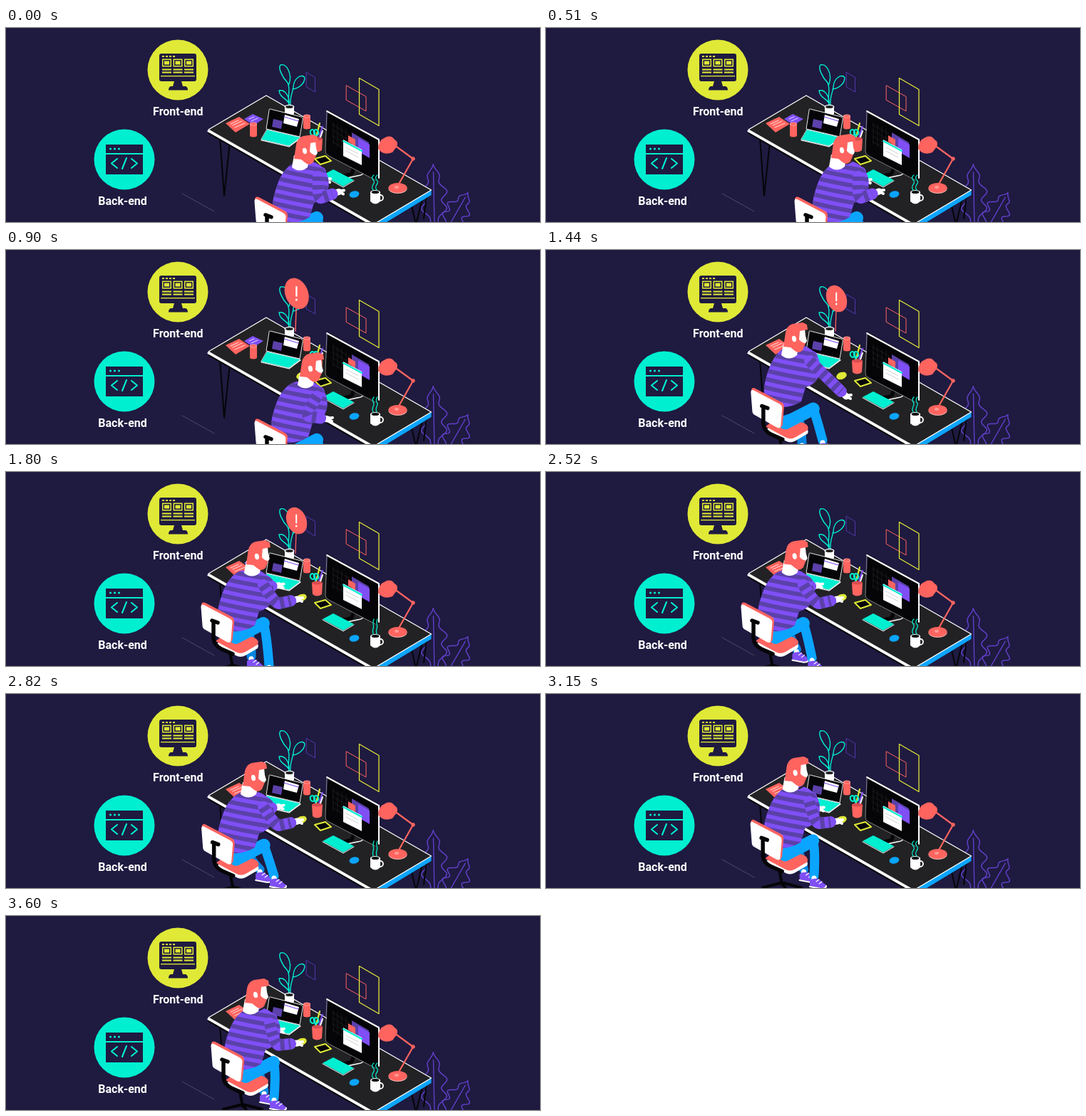
An HTML page with a canvas for the animation above (3630 ms loop, 749 by 273 pixels).

```html
<!DOCTYPE html>
<html lang="en">
<head>
<meta charset="utf-8">
<title>Developer at a desk</title>
<style>
  html, body { margin: 0; width: 100%; height: 100%; overflow: hidden; background: #1f1a40; }
  canvas { display: block; }
</style>
</head>
<body>
<canvas id="stage" width="749" height="273"></canvas>
<script>
const ctx = document.getElementById('stage').getContext('2d');
const LOOP = 3630;
const NIGHT = '#1f1a40', RED = '#ff645f', TEAL = '#00efd1', YELLOW = '#dfe936',
      PURPLE = '#7f4ff5', STRIPE = '#5b41a9', BLUE = '#0ba5ff', BLACK = '#050508',
      DESK = '#222224', WHITE = '#fff', LEAF = '#5f3fc6';

const clamp = v => Math.max(0, Math.min(1, v));
const smooth = v => { v = clamp(v); return v * v * (3 - 2 * v); };

// Each track is a list of [time, x, y].
const tracks = {
  chair: [[0, 75, 54], [1140, 75, 54], [1560, -1, 0], [1740, 0, 0], [2760, 0, 0], [3220, 14, -7]],
  torso: [[0, 77, 50], [600, 77, 50], [860, 75, 47], [1140, 75, 47], [1440, 9, -3], [1700, 0, 0], [2780, 0, 0], [3220, 9, -8]],
  head: [[0, 421, 167], [510, 417, 166], [620, 417, 166], [870, 429, 161], [1140, 428, 163], [1440, 350, 119],
         [1700, 354, 113], [2160, 353, 113], [2820, 349, 112], [3240, 352, 104], [3600, 352, 105]],
  near: [[0, 467, 229], [640, 467, 229], [860, 451, 238], [1140, 451, 238], [1440, 421, 206], [1640, 409, 179]],
  far: [[0, 448, 214], [620, 448, 214], [820, 424, 210], [1140, 424, 210], [1440, 350, 174], [1700, 382, 160]],
  foot: [[0, 455, 326], [1140, 455, 326], [1440, 392, 279], [1700, 373, 283], [2160, 373, 282], [2800, 380, 267]],
  farFoot: [[0, 425, 320], [1140, 425, 320], [1560, 348, 274], [2160, 348, 265], [2780, 360, 258], [3220, 366, 258]]
};

function at(track, t) {
  let prev = track[0];
  for (const key of track) {
    if (key[0] > t) {
      const k = smooth((t - prev[0]) / (key[0] - prev[0]));
      return [prev[1] + (key[1] - prev[1]) * k, prev[2] + (key[2] - prev[2]) * k];
    }
    prev = key;
  }
  return [prev[1], prev[2]];
}

function shape(d, fill, stroke, width = 1) {
  const path = new Path2D(d);
  if (fill) { ctx.fillStyle = fill; ctx.fill(path); }
  if (stroke) { ctx.strokeStyle = stroke; ctx.lineWidth = width; ctx.stroke(path); }
}
const line = (d, color, width) => shape(d, null, color, width);

function oval(x, y, rx, ry, fill, angle = 0) {
  ctx.beginPath();
  ctx.ellipse(x, y, rx, ry, angle, 0, 7);
  ctx.fillStyle = fill;
  ctx.fill();
}

function box(x, y, w, h, color) {
  ctx.fillStyle = color;
  ctx.fillRect(x, y, w, h);
}

function shifted([x, y], draw) {
  ctx.save();
  ctx.translate(x, y);
  draw();
  ctx.restore();
}

function drawBadges() {
  oval(241, 59, 42.5, 42.5, YELLOW);
  ctx.fillStyle = NIGHT;
  ctx.beginPath();
  ctx.roundRect(215, 36, 52, 39, 3);
  ctx.fill();
  for (let i = 0; i < 4; i++) box(219 + i * 5, 39, 3, 2, YELLOW);
  for (let i = 0; i < 3; i++) {
    const x = 219 + i * 15.5;
    box(x, 43.5, 13, 11, YELLOW);
    box(x + 1.5, 45, 10, 8, NIGHT);
    box(x + 3, 46.5, 7, 5, YELLOW);
    box(x, 57.5, 13, 2, YELLOW);
    box(x, 61.5, 13, 2, YELLOW);
  }
  box(217, 67, 48, 1.3, YELLOW);
  shape('M236 75H246L248 82H252Q255 83 255 87.5H228Q228 83 231 82H234Z', NIGHT);

  oval(166, 185, 42.5, 42.5, TEAL);
  box(140, 164, 52, 12, NIGHT);
  box(140, 178, 52, 28, NIGHT);
  for (let i = 0; i < 3; i++) oval(146.5 + i * 6, 170, 1.6, 1.6, TEAL);
  line('M156 184L148 190.5L156 197M176 184L184 190.5L176 197M169 183L163 198', TEAL, 2.1);

  ctx.fillStyle = WHITE;
  ctx.font = 'bold 16px Roboto, sans-serif';
  ctx.textAlign = 'center';
  ctx.fillText('Front-end', 241.3, 123);
  ctx.fillText('Back-end', 163.5, 249);
}

function drawRoom() {
  line('M421.5 62.5L433.5 69.5V90L421.5 83Z', LEAF, .8);
  line('M477.5 81L505 96.5V117L477.5 101.5Z', RED, 1);
  line('M495.5 70.5L523 86.5V137.5L495.5 121.5Z', YELLOW, 1.3);
  line('M247 233L292 258', '#5a5470', .8);
}

function drawLeaf(x, y, height, width, angle) {
  const edge = (u, side) => {
    const lobes = .76 + .24 * Math.cos(u * Math.PI * 7);
    return [side * width * Math.sin(Math.PI * u ** .85) * lobes, -height * u];
  };
  shifted([x, y], () => {
    ctx.rotate(angle);
    ctx.strokeStyle = LEAF;
    ctx.lineWidth = 1.5;
    for (const side of [-1, 1]) {
      ctx.beginPath();
      for (let u = 0; u <= 1.001; u += .025) ctx.lineTo(...edge(u, side));
      ctx.stroke();
    }
    line(`M0 0V${-height * .88}`, LEAF, 1.4);
  });
}

function drawDesk() {
  drawLeaf(601, 280, 88, 20, -.02);
  drawLeaf(618, 284, 60, 19, .52);
  line('M300 154L306 236L314 160M568 246L575 277L584 240M590 236L586 268', BLACK, 2);
  shape('M284 143L516 276V282L284 149Z', BLACK);
  line('M284 145L516 278', WHITE, 3);
  shape('M596.5 228L516 276V284L596.5 235Z', BLUE);
  shape('M284 143L365 95L596.5 228L516 276Z', DESK, WHITE, 1.3);
}

function drawCan(x, y) {
  box(x - 5, y - 8, 10, 16, RED);
  oval(x, y + 8, 5, 2.5, RED);
  oval(x, y - 8, 5, 2.6, '#ff9994');
  oval(x, y - 8, 3.7, 1.7, RED);
}

function drawAlert(t) {
  if (t < 630 || t > 2250) return;
  const grow = t < 900 ? 1.16 * smooth((t - 630) / 240) : 1.16 - .16 * smooth((t - 900) / 180);
  ctx.save();
  ctx.globalAlpha = 1 - smooth((t - 2010) / 230);
  ctx.translate(406, 114);
  ctx.scale(grow, grow);
  line('M0 0L1 -30', RED, 1.3);
  oval(1.5, -45.5, 13.8, 19.5, RED, -.38);
  line('M1.2 -53.5V-42.5', WHITE, 2);
  oval(1.2, -38, 1.3, 1.5, WHITE);
  ctx.restore();
}

function drawPlantAndLaptop(t) {
  shape('M308 134L327 125L342 135L322 147Z', RED);
  line('M315 135L326 130M318 137L331 131M321 140L335 134', WHITE, .8);
  shape('M334 128L346 121L361 128L347 137Z', PURPLE);
  line('M341 128L348 125M344 131L353 127', WHITE, .8);
  drawCan(347, 143);
  drawCan(422, 132);

  line('M397 110C394 94 400 88 395 77C388 70 381 56 385 52C393 49 402 64 397 79M399 110C398 94 403 89 403 83C404 69 416 64 419 70C419 80 407 86 402 86M397 107C395 99 384 99 383 88C391 86 398 96 397 107', TEAL, 1.4);
  drawAlert(t);
  shape('M391 111V121Q397.5 128 404 121V111Z', WHITE);
  oval(397.5, 111, 7, 3.2, WHITE);
  oval(397.5, 111, 5.3, 2.1, DESK);

  shape('M371 114Q369 113 369 116L365 142L412 153L416 130Q417 126 414 125Z', BLACK, WHITE, .9);
  shape('M375 128L388 131L386 142L373 139Z', STRIPE);
  shape('M391 122L411 128L408 139L389 134Z', WHITE);
  line('M390 125L410 131', PURPLE, 1.2);
  shape('M366 143L413 154L397 166L358 157Z', TEAL, WHITE, .7);
  line('M358 158L397 167L413 155', WHITE, 1.2);
}

function drawTools() {
  line('M434 157L440 134', YELLOW, 2.2);
  line('M438 157L444 139', PURPLE, 2.2);
  line('M440 157L444 145', WHITE, 2);
  line('M435 157L433 148', TEAL, 2);
  ctx.strokeStyle = TEAL;
  for (const x of [430, 435]) {
    ctx.beginPath();
    ctx.ellipse(x, 147, 3.2, 4, -.3, 0, 7);
    ctx.stroke();
  }
  shape('M429 156H444L443 172Q436 177 430 172Z', RED);
  oval(436.5, 156, 7.5, 2.5, '#d94c50');
  shape('M433 184L448 180L456 187L441 192Z', BLACK, YELLOW, 2);
  oval(414.5, 177, 7.5, 5, YELLOW, -.35);
}

function drawMonitor() {
  line('M488 196L486 202Q486 206 478 207L468 209', BLACK, 5);
  line('M501 201Q503 207 493 208L474 212L468 208', WHITE, 1.3);
  shape('M452 116L523 156V211Q522 215 518 214L451 179Q448 177 448 173Z', BLACK);
  line('M450 117L523 157V211', WHITE, 2);
  line('M450 117L448 173Q448 177 451 179L518 214', '#999', .8);
  ctx.globalAlpha = .2;
  for (let i = 0; i < 4; i++) {
    line(`M${459 + i * 6} ${133 + i * 3}V${164 + i * 3}M458 ${136 + i * 8}L482 ${150 + i * 8}`, '#aaa', .6);
  }
  ctx.globalAlpha = 1;
  shape('M485 147L509 161V181L485 168Z', STRIPE);
  shape('M494 155L510 164V183L494 174Z', PURPLE);
  shape('M480 151L490 157V166L480 160Z', RED);
  shape('M473 157L499 171V193L473 180Z', WHITE);
  line('M473 159L499 173', TEAL, 2);
  line('M477 168L494 177M477 173L494 182', '#cfd0d5', 1);

  shape('M444 207L459 199L488 214L473 223Z', TEAL);
  line('M444 208L473 224L488 215', WHITE, 1);
  oval(488.5, 234, 7, 4.7, BLUE, -.2);
}

function drawMugAndLamp(t) {
  ctx.strokeStyle = WHITE;
  ctx.lineWidth = 1.8;
  ctx.beginPath();
  ctx.ellipse(525, 239, 4, 4, 0, 0, 7);
  ctx.stroke();
  shape('M511 231H525V244Q518 251 511 244Z', WHITE);
  oval(518, 231, 7, 3, WHITE);
  oval(518, 231, 5.3, 2, BLACK);
  const sway = 1.5 * Math.cos(t / LOOP * Math.PI * 14);
  for (const x of [514, 519]) {
    line(`M${x + 1} 228C${x - 3 - sway} 221 ${x + 5 + sway} 219 ${x + 1} 214Q${x - 1 - sway} 210 ${x + 2} 207`, TEAL, 1.3);
  }

  oval(549.5, 226, 13, 7, '#ffc0ba');
  oval(549.5, 225, 13, 7, RED);
  line('M549 223L571 184L545 165', RED, 2.2);
  oval(571, 184, 2.7, 2.7, RED);
  oval(548, 224, 3, 2, '#ff9994');
  shape('M522 170Q522 158 532 154Q540 150 545 157Q551 160 548 167L542 175Q529 180 522 170Z', RED);
}

// Stripes run across the limb by dashing the same path.
function sleeve(d) {
  line(d, PURPLE, 16);
  ctx.save();
  ctx.lineCap = 'butt';
  ctx.setLineDash([6, 6]);
  line(d, STRIPE, 16);
  ctx.restore();
}

function drawArm([sx, sy], [hx, hy], reach, curl) {
  const dx = hx - sx, dy = hy - sy, dist = Math.hypot(dx, dy) || 1;
  const bend = Math.sqrt(Math.max(0, reach * reach - dist * dist / 4)) * curl;
  const ex = (sx + hx) / 2 - dy / dist * bend, ey = (sy + hy) / 2 + dx / dist * bend;
  const angle = Math.atan2(hy - ey, hx - ex);
  const cx = hx - 10 * Math.cos(angle), cy = hy - 10 * Math.sin(angle);
  line(`M${cx} ${cy}L${hx} ${hy}`, WHITE, 9);
  line(`M${hx} ${hy - 1}l7 -1M${hx} ${hy}l6 3`, WHITE, 4);
  sleeve(`M${sx} ${sy}Q${ex} ${ey} ${ex + (cx - ex) * .25} ${ey + (cy - ey) * .25}L${cx} ${cy}`);
}

function drawShoe([x, y]) {
  shape(`M${x - 10} ${y - 5}Q${x - 3} ${y - 9} ${x + 3} ${y - 6}L${x + 13} ${y + 2}Q${x + 13} ${y + 6} ${x + 6} ${y + 6}L${x - 10} ${y + 3}Z`, PURPLE);
  line(`M${x - 10} ${y + 4}L${x + 6} ${y + 7}Q${x + 13} ${y + 7} ${x + 13} ${y + 3}`, WHITE, 2);
  line(`M${x - 1} ${y - 3}l4 -3M${x + 3} ${y}l4 -3`, WHITE, 1.2);
}

function drawLeg([cx, cy], hip, knee, foot, color) {
  const kx = knee[0] + cx, ky = knee[1] + cy;
  line(`M${hip[0] + cx} ${hip[1] + cy}L${kx} ${ky}`, color, 18);
  line(`M${kx} ${ky}Q${kx + 4} ${ky + 10} ${foot[0] - 4} ${foot[1] - 11}`, color, 13);
  line(`M${foot[0] - 4} ${foot[1] - 8}v4`, WHITE, 7);
  drawShoe(foot);
}

function drawTorso() {
  const outline = 'M333 138C319 141 309 154 303 172C297 190 294 204 301 219Q325 231 349 216L355 196C373 192 380 174 373 155Q365 141 353 138Q343 146 333 138Z';
  shape(outline, PURPLE);
  ctx.save();
  ctx.clip(new Path2D(outline));
  for (let y = 136; y < 230; y += 12) line(`M290 ${y - 2}Q325 ${y + 8} 380 ${y + 16}`, STRIPE, 6);
  ctx.restore();
}

function drawHead() {
  shape('M-17 12L-20 29Q-9 38 2 29L5 14Z', WHITE);
  shape('M-2 -8H13L14 2L16 9L12 15L2 14Z', WHITE);
  shape('M-17 17L-14 -3Q-12 -13 -4 -15L10 -17L16 -14L17 -7L6 -5L5 7Q9 12 14 12L10 22Q4 28 -2 22L-7 18Z', RED);
  oval(-2, 6, 3, 4.3, WHITE, -.2);
}

function drawSeat() {
  line('M314 254L318 275M318 272L291 279M318 272L345 279M318 272L326 285', BLACK, 4);
  const cushion = 'M294 238L322 253Q329 257 336 253L353 243Q356 237 348 233L315 222Z';
  shifted([0, 5], () => shape(cushion, WHITE));
  shape(cushion, RED);
}

function drawChairBack() {
  const panel = 'M279 185Q275 183 275 188L277 214Q277 218 281 220L311 237Q317 240 317 234L319 210Q319 206 315 204Z';
  shape(panel, RED, RED, 2);
  shifted([-1.5, 2], () => shape(panel, WHITE));
  line('M289 209L297 212M291 211V234Q292 244 302 249L318 256', BLACK, 5.5);
}

function drawMan(t) {
  const pose = {};
  for (const name in tracks) pose[name] = at(tracks[name], t);
  const { chair, torso, head, near, far } = pose;
  const typing = t < 600 || t > 1700;
  if (typing) {
    far[1] += 1.5 * Math.sin(t / 38);
    far[0] += Math.sin(t / 70);
    if (t < 600) near[1] += 1.5 * Math.cos(t / 38);
  }
  drawLeg(chair, [318, 232], [340, 226], pose.farFoot, '#0786e0');
  shifted(chair, drawSeat);
  drawLeg(chair, [322, 233], [361, 213], pose.foot, BLUE);
  drawArm([torso[0] + 364, torso[1] + 153], far, 14, .5);
  shifted(torso, drawTorso);
  drawArm([torso[0] + 361, torso[1] + 159], near, 32, 1);
  shifted(head, drawHead);
  shifted(chair, drawChairBack);
}

function render(t) {
  ctx.lineCap = ctx.lineJoin = 'round';
  box(0, 0, 749, 273, NIGHT);
  drawBadges();
  drawRoom();
  drawDesk();
  drawPlantAndLaptop(t);
  drawTools();
  drawMonitor();
  drawMugAndLamp(t);
  drawMan(t);
}

const start = performance.now();
function tick() {
  render((performance.now() - start) % LOOP);
  requestAnimationFrame(tick);
}
tick();
</script>
</body>
</html>
```
